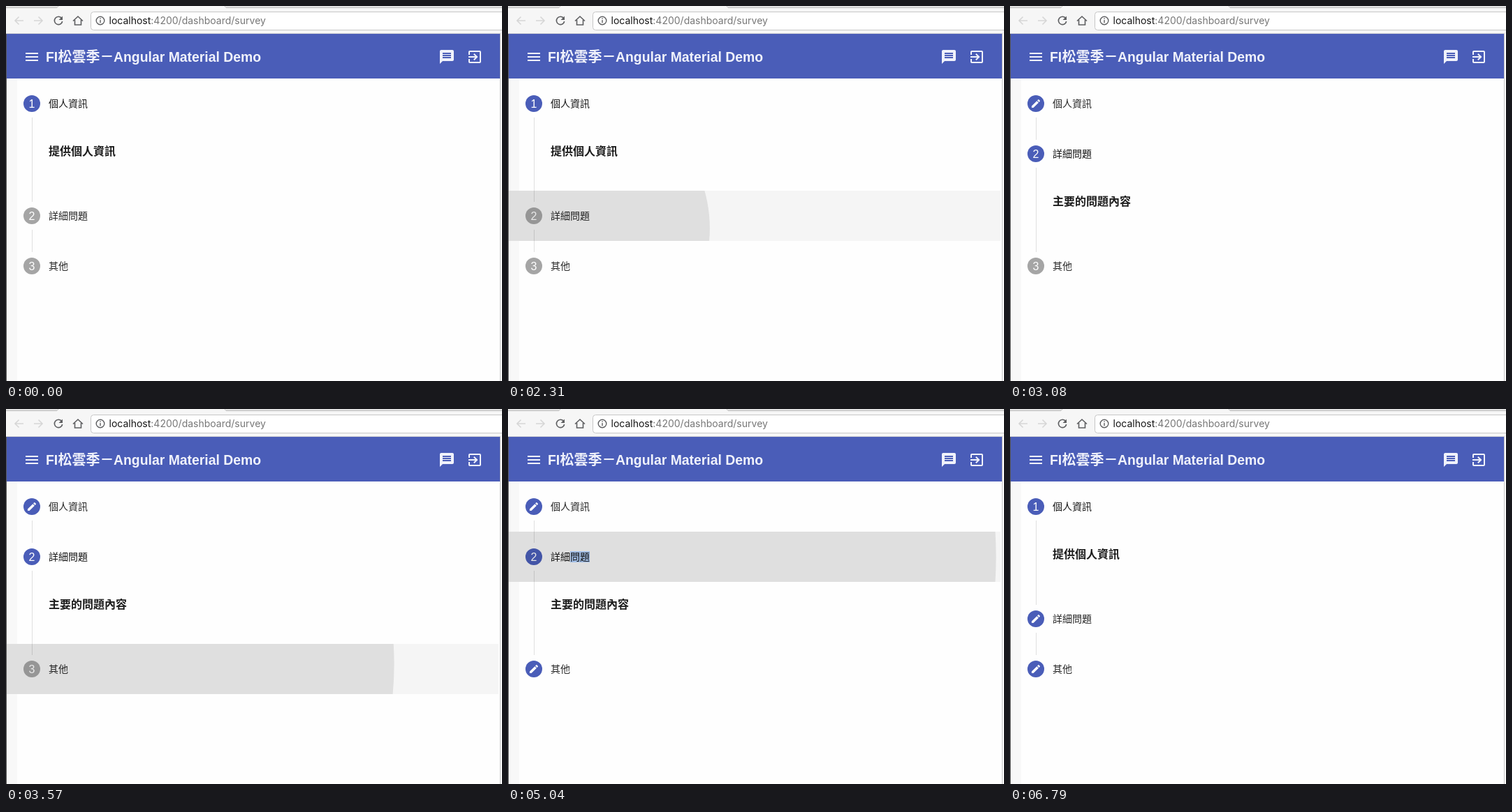
Write an HTML page that moves like this. It is 710 px wide and 538 px high and loops after 7350 ms.

```html
<!DOCTYPE html>
<html lang="zh-Hant-TW">
<head>
<meta charset="utf-8">
<title>Stepper demo</title>
<style>
html, body { margin: 0; width: 100%; height: 100%; overflow: hidden; background: #fff; }
#stage { display: block; width: 710px; height: 538px; }
.cjk { font-family: "Noto Sans CJK TC", "Noto Sans CJK", sans-serif; }
.label { font-size: 14px; }
.title { font-size: 16px; font-weight: 700; fill: #1c1c1c; }
.bar { fill: #f0f2fb; font-weight: 700; }
.latin { font-family: "Liberation Sans", Arial, sans-serif; }
.url { font: 14px Inter, sans-serif; }
.number { font-size: 16px; fill: #fff; text-anchor: middle; }
.nav { fill: none; stroke-width: 1.6; }
</style>
</head>
<body>
<svg id="stage" viewBox="0 0 710 538">
  <rect width="710" height="538" fill="#fefefe"/>

  <!-- browser chrome -->
  <rect width="710" height="40" fill="#f6f6f6"/>
  <path d="M0 0H73V2H0zM315 0H710V2H315z" fill="#e2e2e2"/>
  <path d="M0 2.5H73L75 0M313 0L315 2.5H710" fill="none" stroke="#bdbdbd"/>
  <g class="nav" stroke="#d6d6d6">
    <path d="M25 21H13M18.500 15.500L13 21l5.500 5.500"/>
    <path d="M40 21H52M46.500 15.500L52 21l-5.500 5.500"/>
  </g>
  <g class="nav" stroke="#5e5f61">
    <path d="M79.500 17.300A5.700 5.700 0 1 0 80.700 22"/>
    <path d="M81 14.500V20h-5.500z" fill="#5e5f61" stroke="none"/>
    <path d="M96 21.500L103 15l7 6.500M98.500 20v7h9v-7"/>
    <circle cx="135" cy="21" r="5.800" stroke-width="1.400"/>
  </g>
  <rect x="121.500" y="8.500" width="600" height="26" rx="4" fill="#fff" stroke="#c6c6c6"/>
  <g fill="none" stroke="#5e5f61" stroke-width="1.400">
    <circle cx="135" cy="21" r="5.800"/>
    <path d="M135 20v4.200M135 17.300v1.500"/>
  </g>
  <text class="url" x="147.500" y="26" fill="#161616">localhost<tspan fill="#777">:4200/dashboard/survey</tspan></text>

  <!-- page frame -->
  <rect x="1" y="104" width="15" height="434" fill="#f8f8f8"/>
  <rect x="1" y="40" width="706" height="64" fill="#4a5db8"/>
  <path d="M0 39.500H708" stroke="#c9cad2"/>
  <path d="M.5 40V538" stroke="#555"/>
  <path d="M707.500 40V538" stroke="#c4c4c4"/>
  <g class="bar">
    <path transform="translate(25 61)" d="M3 18h18v-2H3zM3 13h18v-2H3zM3 6v2h18V6z"/>
    <path transform="translate(619 61)" d="M20 2H4c-1.100 0-2 .9-2 2v18l4-4h14c1.100 0 2-.9 2-2V4c0-1.100-.9-2-2-2zm-2 12H6v-2h12zm0-3H6V9h12zm0-3H6V6h12z"/>
    <path transform="translate(659 61)" d="M10.090 15.590L11.500 17l5-5-5-5-1.410 1.410L12.670 11H3v2h9.670zM19 3H5c-1.110 0-2 .9-2 2v4h2V5h14v14H5v-4H3v4c0 1.100.89 2 2 2h14c1.100 0 2-.9 2-2V5c0-1.100-.9-2-2-2z"/>
    <text class="latin" x="57" y="80" font-size="19.400">FI</text>
    <text class="cjk" x="74.500" y="80" font-size="20">松雲季－</text>
    <text class="latin" x="154" y="80" font-size="19.400">Angular Material Demo</text>
  </g>
  <g id="steps"></g>
</svg>

<script>
const LOOP = 7350, TICK = 70;
const TOP = 104, HEADER = 72, CONTENT = 89, WIDTH = 704;
const BLUE = '#4a5db8', GRAY = '#a5a5a5';
const GROW = 500, FADE_DELAY = 450, FADE = 400, EXPAND = 225;
const PENCIL = 'M3 17.250V21h3.750L17.810 9.940l-3.750-3.750zM20.710 7.040c.39-.39.39-1.020 0-1.410l-2.340-2.340c-.39-.39-1.020-.39-1.410 0l-1.830 1.830 3.750 3.750z';

const STEPS = [
  ['個人資訊', '提供個人資訊'],
  ['詳細問題', '主要的問題內容'],
  ['其他', '其他問題']
];
// x, y are relative to the pressed header; the step changes on release
const CLICKS = [
  { step: 1, at: 2256, hold: 234, x: 89, y: 54 },
  { step: 2, at: 3370, hold: 234, x: 89, y: 29 },
  { step: 1, at: 4615, hold: 185, x: 102, y: 36 },
  { step: 0, at: 5735, hold: 234, x: 95, y: 40 }
];
const HOVERS = [
  { step: 1, from: 2030, to: 2660 },
  { step: 2, from: 3150, to: 3690 },
  { step: 1, from: 4600, to: 5290 },
  { step: 0, from: 5290, to: 6500 }
];
const SELECTION = { step: 1, from: 4690, to: 5735 };

const clamp = v => Math.min(1, Math.max(0, v));
const within = (t, span) => t >= span.from && t < span.to;

function bezier(x1, y1, x2, y2) {
  const at = (s, a, b) => 3 * s * (1 - s) ** 2 * a + 3 * s * s * (1 - s) * b + s ** 3;
  return v => {
    const x = clamp(v);
    let lo = 0, hi = 1;
    for (let i = 0; i < 24; i++) {
      const mid = (lo + hi) / 2;
      if (at(mid, x1, x2) < x) lo = mid; else hi = mid;
    }
    return at(hi, y1, y2);
  };
}
const decelerate = bezier(0, 0, 0.2, 1);
const standard = bezier(0.4, 0, 0.2, 1);

function set(node, attrs) {
  for (const key in attrs) node.setAttribute(key, attrs[key]);
}
function add(parent, tag, attrs, text) {
  const node = document.createElementNS('http://www.w3.org/2000/svg', tag);
  set(node, attrs);
  if (text) node.textContent = text;
  return parent.appendChild(node);
}

const root = document.getElementById('steps');
const rows = STEPS.map(([label, title], i) => {
  const body = add(root, 'svg', { x: 1, width: WIDTH, height: 0 });
  add(body, 'text', { class: 'cjk title', x: 60, y: 38 }, title);

  const head = add(root, 'svg', { x: 1, width: WIDTH, height: HEADER });
  const row = { body, head };
  row.hover = add(head, 'rect', { width: WIDTH, height: HEADER, fill: '#f5f5f5' });
  row.selection = add(head, 'rect', { x: 88, y: 28, width: 28, height: 16, fill: '#b0cffa' });
  row.disc = add(head, 'circle', { cx: 36, cy: 36, r: 12 });
  row.number = add(head, 'text', { class: 'latin number', x: 36, y: 41.7 }, String(i + 1));
  row.pencil = add(head, 'path', { d: PENCIL, fill: '#fff', transform: 'translate(28 28) scale(.6667)' });
  row.label = add(head, 'text', { class: 'cjk label', x: 60, y: 41 }, label);
  row.ripple = add(head, 'circle', { fill: '#000' });
  return row;
});
const lines = [0, 1].map(() => add(root, 'rect', { x: 37, width: 1, fill: '#000', 'fill-opacity': 0.12 }));

function stepState(t) {
  let active = 0, open = [1, 0, 0];
  const visited = new Set();
  for (const click of CLICKS) {
    const release = click.at + click.hold;
    if (t < release) break;
    const p = standard((t - release) / EXPAND);
    open = open.map((_, i) => i === click.step ? p : i === active ? 1 - p : 0);
    visited.add(active);
    active = click.step;
  }
  return { active, open, visited };
}

function drawRipple(row, step, t) {
  const click = CLICKS.find(c => c.step === step && t >= c.at && t < c.at + FADE_DELAY + FADE);
  if (!click) return set(row.ripple, { r: 0 });
  const { x, y, at } = click;
  const reach = Math.hypot(Math.max(x, WIDTH - x), Math.max(y, HEADER - y));
  const fade = decelerate((t - at - FADE_DELAY) / FADE);
  set(row.ripple, {
    cx: x, cy: y,
    r: reach * decelerate((t - at) / GROW),
    'fill-opacity': 0.09 * (1 - fade)
  });
}

function render(t) {
  const { active, open, visited } = stepState(t);
  let y = TOP;
  rows.forEach((row, i) => {
    const on = i === active, edit = !on && visited.has(i);
    const bottom = y + HEADER + CONTENT * open[i];
    const top = Math.round(y), bodyTop = top + HEADER;
    const height = Math.max(0, Math.round(bottom) - bodyTop);
    const show = flag => ({ visibility: flag ? 'visible' : 'hidden' });

    set(row.head, { y: top });
    set(row.body, { y: bodyTop, height, ...show(height > 0) });
    set(row.hover, show(HOVERS.some(h => h.step === i && within(t, h))));
    set(row.selection, show(SELECTION.step === i && within(t, SELECTION)));
    set(row.disc, { fill: on || edit ? BLUE : GRAY });
    set(row.number, show(!edit));
    set(row.pencil, show(edit));
    set(row.label, { 'font-weight': on ? 500 : 400, fill: on ? '#151515' : '#252525' });
    drawRipple(row, i, t);
    if (lines[i]) set(lines[i], { y: bodyTop - 16, height: height + 32 });
    y = bottom;
  });
}

const start = performance.now();
function frame() {
  const t = (performance.now() - start) % LOOP;
  render(Math.floor(t / TICK) * TICK);
  requestAnimationFrame(frame);
}
frame();
</script>
</body>
</html>
```
